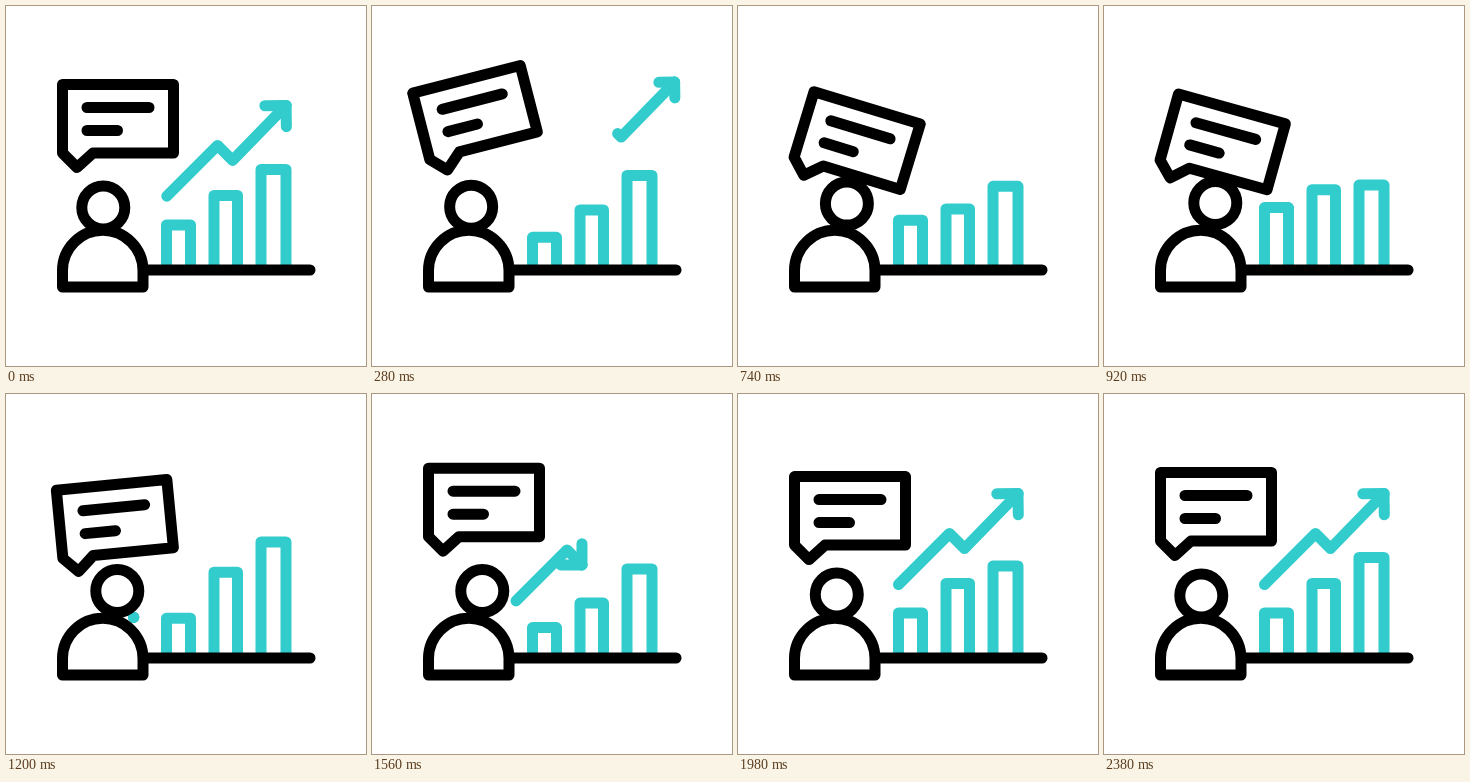
An HTML page for the animation above (2.4 s loop, 360 px wide and 360 px high).

```html
<!DOCTYPE html>
<html lang="en">
<head>
<meta charset="utf-8">
<title>Growth presentation</title>
<style>
  html, body { margin: 0; width: 100%; height: 100%; overflow: hidden; background: #fff; }
  svg { display: block; width: 100%; height: 100%; }
  svg * {
    animation-duration: 2400ms;
    animation-iteration-count: infinite;
    animation-timing-function: ease-in-out;
  }
  .ink, .teal { fill: none; stroke-width: 11; stroke-linecap: round; stroke-linejoin: round; }
  .ink { stroke: #000; }
  .teal { stroke: #33cccc; }
  .solid { fill: #fff; }

  .bubble { transform-origin: 71px 143.5px; animation-name: sway, bob; }
  @keyframes sway {
    0%, 65%, 100% { rotate: 0deg; }
    17.5% { rotate: -18.7deg; }
    33.3% { rotate: 18.7deg; }
    54.6% { rotate: -8deg; }
  }
  @keyframes bob {
    0% { translate: 0 0; animation-timing-function: linear; }
    22.5% { translate: 0 5.8px; animation-timing-function: linear; }
    38.3% { translate: 0 11px; animation-timing-function: linear; }
    50% { translate: 0 16px; }
    59% { translate: 0 -8px; }
    75.5% { translate: 0 5px; }
    99%, 100% { translate: 0 0; }
  }

  .head { animation-name: lean; }
  @keyframes lean {
    0% { translate: 0 0; animation-timing-function: ease-in; }
    22.5% { translate: 5.5px -2.5px; animation-timing-function: ease-out; }
    38.3%, 60% { translate: 14px -4.5px; animation-timing-function: ease-in; }
    65% { translate: 13px -4.5px; animation-timing-function: linear; }
    82.5% { translate: 1.5px -1px; animation-timing-function: ease-out; }
    90%, 100% { translate: 0 0; }
  }

  .bar1 { animation-name: bar1; }
  .bar2 { animation-name: bar2; }
  .bar3 { animation-name: bar3; }
  @keyframes bar1 {
    0%, 79%, 100% { translate: 0 0; }
    21% { translate: 0 20.5px; }
    37.5% { translate: 0 -17.5px; }
    59% { translate: 0 18px; }
  }
  @keyframes bar2 {
    0%, 82.5%, 100% { translate: 0 0; }
    21.5% { translate: 0 25px; }
    46.5% { translate: 0 -14.5px; }
    63% { translate: 0 20px; }
  }
  @keyframes bar3 {
    0%, 97%, 100% { translate: 0 0; }
    28% { translate: 0 16.5px; }
    36% { translate: 0 17.5px; }
    50% { translate: 0 -15.5px; }
    65% { translate: 0 11.5px; }
    73% { translate: 0 12.5px; }
  }

  .arrow { animation-name: slide, blink; animation-timing-function: linear, step-end; }
  @keyframes slide {
    0%, 80%, 100% { translate: 0 0; }
    22.5%, 23% { translate: 43.5px -45px; }
    23.01%, 42% { translate: -43px 43px; }
    50% { translate: -33px 33px; }
    65% { translate: -16.5px 16.5px; }
  }
  @keyframes blink {
    0%, 42%, 100% { visibility: visible; }
    23% { visibility: hidden; }
  }

  .shaft { stroke-dasharray: 100 200; animation-name: trim; animation-timing-function: linear; }
  @keyframes trim {
    0%, 80%, 100% { stroke-dashoffset: 0; }
    22.5%, 23% { stroke-dashoffset: -99.9; }
    23.01%, 50% { stroke-dashoffset: 99.9; }
    65% { stroke-dashoffset: 45.3; }
  }

  .tip {
    offset-path: path("M160.5 190.5L211.5 139.5L226.5 154.5L280 99.5");
    offset-rotate: auto;
    offset-distance: 100%;
    animation-name: ride;
    animation-timing-function: linear;
  }
  @keyframes ride {
    0%, 23%, 80%, 100% { offset-distance: 100%; }
    23.01%, 50% { offset-distance: 0%; }
    65% { offset-distance: 54.7%; }
  }
  .arm { stroke-dasharray: 100 200; animation-name: grow; animation-timing-function: linear; }
  @keyframes grow {
    0%, 8%, 58%, 100% { stroke-dashoffset: 0; }
    22.5%, 50% { stroke-dashoffset: 99.9; }
  }
</style>
</head>
<body>
<svg viewBox="0 0 360 360">
  <clipPath id="floor"><path d="M0 0H360V264H0Z"/></clipPath>
  <g class="teal" clip-path="url(#floor)">
    <path class="bar1" d="M160.5 330V219H184.5V330"/>
    <path class="bar2" d="M208 330V189.5H231.5V330"/>
    <path class="bar3" d="M255 330V163.5H280V330"/>
  </g>
  <g class="teal arrow">
    <path class="shaft" pathLength="100" d="M160.5 190.5L211.5 139.5L226.5 154.5L280 99.5"/>
    <g class="tip">
      <path class="arm" pathLength="100" d="M0 0L-15 -15"/>
      <path class="arm" pathLength="100" d="M0 0L-15 15"/>
    </g>
  </g>
  <path class="ink" d="M140 264H304"/>
  <g class="ink bubble">
    <path d="M56.5 78.5H167.5V147H87L71 161.5L56.5 147Z"/>
    <path d="M81 101.5H143M81 124.5H111.5"/>
  </g>
  <circle class="ink solid head" cx="97.3" cy="201.5" r="21.5"/>
  <path class="ink solid" d="M56.5 281V264.5A40.25 40.25 0 0 1 137 264.5V281Z"/>
</svg>
</body>
</html>
```
